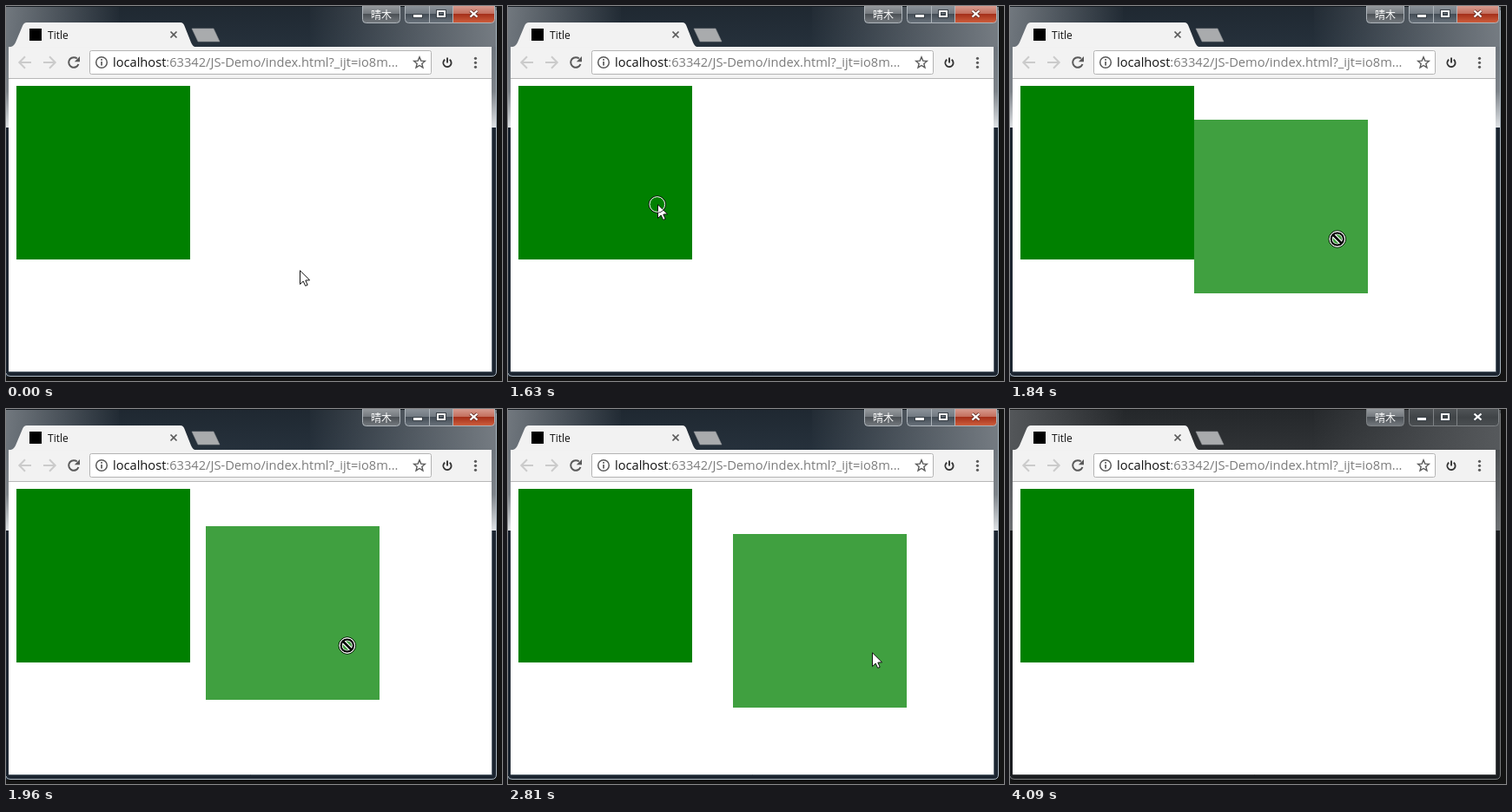
These frames come from a looping animation (571x432 px, 4.16 s). An HTML page with a canvas:

```html
<!DOCTYPE html>
<html lang="en">
<head>
<meta charset="utf-8">
<title>Drag demo</title>
<style>
  html, body { margin: 0; width: 100%; height: 100%; overflow: hidden; background: #141414; }
  canvas { display: block; }
</style>
</head>
<body>
<canvas id="stage" width="571" height="432"></canvas>
<script>
const g = document.getElementById('stage').getContext('2d');
const LOOP = 4160;
const SANS = '"Open Sans", "Noto Sans", sans-serif';
const CJK = '"Noto Sans CJK SC", "Noto Sans CJK", sans-serif';

// [time, x, y]
const approach = [[370, 337, 300], [420, 336, 295], [460, 335, 291], [510, 334, 289]];
const toBox = [[1070, 331, 289], [1130, 324, 286], [1170, 307, 279], [1210, 282, 269], [1250, 251, 257],
  [1290, 220, 246], [1330, 195, 236], [1380, 178, 230], [1420, 172, 228]];
const leave = [[3090, 434, 313], [3130, 466, 392]];
const moves = [[0, 338, 304], ...approach, ...toBox, [2810, 419, 280], ...leave];
const drag = [[1630, 172, 228], [1660, 195, 236], [1720, 291, 257], [1750, 346, 262], [1780, 368, 266],
  [1930, 390, 271], [1960, 393, 272], [2110, 416, 279], [2140, 418, 280], [2289, 418, 280], [2290, 419, 280]];
const GRAB = [160, 136];

function rect(x, y, w, h, fill) {
  g.fillStyle = fill;
  g.fillRect(x, y, w, h);
}

function poly(points, fill, stroke, width = 1) {
  g.beginPath();
  points.forEach(([x, y]) => g.lineTo(x, y));
  g.closePath();
  if (fill) { g.fillStyle = fill; g.fill(); }
  if (stroke) { g.strokeStyle = stroke; g.lineWidth = width; g.stroke(); }
}

function line(points, color, width) {
  g.beginPath();
  points.forEach(([x, y]) => g.lineTo(x, y));
  g.strokeStyle = color;
  g.lineWidth = width;
  g.stroke();
}

function arc(x, y, r, color, width, from = 0, to = Math.PI * 2) {
  g.beginPath();
  g.arc(x, y, r, from, to);
  g.strokeStyle = color;
  g.lineWidth = width;
  g.stroke();
}

function box(x, y, w, h, radii, fill, stroke) {
  g.beginPath();
  g.roundRect(x, y, w, h, radii);
  if (fill) { g.fillStyle = fill; g.fill(); }
  if (stroke) { g.strokeStyle = stroke; g.lineWidth = 1; g.stroke(); }
}

function grad(x0, y0, x1, y1, ...stops) {
  const gr = g.createLinearGradient(x0, y0, x1, y1);
  stops.forEach(([at, color]) => gr.addColorStop(at, color));
  return gr;
}

function text(str, x, y, font, color, align = 'left') {
  g.font = font;
  g.fillStyle = color;
  g.textAlign = align;
  g.fillText(str, x, y);
}

function drawFrame(active) {
  rect(0, 0, 571, 432, '#141414');
  box(-8, -8, 573, 435, 6, active ? '#1c2530' : '#1b1d20');
  rect(0, 0, 565, 48, active ? grad(0, 0, 0, 48, [0, '#1f2831'], [1, '#26313c'])
                             : grad(0, 0, 0, 48, [0, '#24272a'], [1, '#303336']));
  const glow = active ? '128,134,140' : '92,95,98';
  rect(0, 0, 130, 48, grad(0, 0, 130, 24, [0, `rgba(${glow},.85)`], [1, `rgba(${glow},0)`]));
  rect(350, 0, 215, 48, grad(350, 48, 565, 10, [0, `rgba(${glow},0)`], [1, `rgba(${glow},.9)`]));

  const side = active ? grad(0, 47, 0, 140, [0, '#6f767d'], [.55, '#7d8389'], [1, '#dfe2e5'])
                      : grad(0, 47, 0, 140, [0, '#4b4e51'], [1, '#6d7073']);
  rect(0, 47, 3, 93, side);
  rect(559, 47, 6, 93, side);

  const edge = active ? '#a9b6c0' : '#77797b';
  g.beginPath();
  g.moveTo(564.5, 5);
  g.lineTo(564.5, 421);
  g.quadraticCurveTo(564.5, 426.5, 559, 426.5);
  g.lineTo(5, 426.5);
  g.quadraticCurveTo(.5, 426.5, 0, 423);
  g.strokeStyle = edge;
  g.lineWidth = 1;
  g.stroke();
  rect(0, 0, 565, 1, active ? '#151b21' : '#1a1b1c');
  line([[3, 421.5], [559.5, 421.5], [559.5, 140]], active ? '#58636d' : '#47494b', 1);
}

function drawButtons(active) {
  const rim = active ? '#aeb5bb' : '#7f8386';
  const glass = active
    ? grad(0, 0, 0, 19, [0, '#8b9299'], [.45, '#727a82'], [.5, '#434c55'], [1, '#68717a'])
    : grad(0, 0, 0, 19, [0, '#505457'], [.5, '#404447'], [1, '#4a4e51']);
  const user = grad(0, 0, 0, 19, [0, '#969a9e'], [.45, '#757a7f'], [.5, '#4c5156'], [1, '#73787d']);
  const red = grad(0, 0, 0, 19, [0, '#d79b8f'], [.45, '#c4705f'], [.5, '#a5301a'], [1, '#cd5d3c']);

  box(410.5, -4.5, 43, 24, 4, user, rim);
  text('晴木', 432, 14.5, `12px ${CJK}`, '#fff', 'center');
  box(459.5, -4.5, 28, 24, [0, 0, 0, 4], glass, rim);
  box(487.5, -4.5, 27, 24, 0, glass, rim);
  box(514.5, -4.5, 48, 24, [0, 0, 4, 0], active ? red : glass, rim);

  const dark = '#3a4148';
  rect(468, 9, 12, 5, dark);
  rect(469, 10, 10, 3, '#fff');
  g.strokeStyle = dark;
  g.lineWidth = 4;
  g.strokeRect(497, 6, 8, 6);
  g.strokeStyle = '#fff';
  g.lineWidth = 2;
  g.strokeRect(497, 6, 8, 6);
  for (const [color, w] of [[active ? '#6a3229' : dark, 4], ['#fff', 2.3]]) {
    line([[534.5, 5.5], [542.5, 12.5]], color, w);
    line([[542.5, 5.5], [534.5, 12.5]], color, w);
  }
}

function drawToolbar() {
  const bar = '#f2f2f2', ink = '#5a5a5a', faint = '#cbcbcb';
  poly([[214, 26], [239, 26], [246, 41], [221, 41]], '#a9abad', '#8b8f93', .6);
  rect(3, 47, 556, 36, bar);
  g.beginPath();
  g.moveTo(3, 47.5);
  g.quadraticCurveTo(9, 47, 11, 42);
  g.lineTo(19, 23);
  g.quadraticCurveTo(20.5, 19, 24, 19);
  g.lineTo(201, 19);
  g.quadraticCurveTo(204, 19, 205.5, 23);
  g.lineTo(213, 42);
  g.quadraticCurveTo(215, 47, 219, 47.5);
  g.closePath();
  g.fillStyle = bar;
  g.fill();
  rect(3, 83, 556, 1, '#b8b8b8');

  rect(27, 26, 14, 14, '#000');
  text('Title', 48, 37.5, `12px ${SANS}`, '#111');
  line([[189.5, 29.5], [196.5, 36.5]], ink, 1.7);
  line([[196.5, 29.5], [189.5, 36.5]], ink, 1.7);

  // back and forward
  for (const [x, d] of [[22, -1], [50, 1]]) {
    line([[x - 7 * d, 65], [x + 6 * d, 65]], faint, 2);
    line([[x, 58.3], [x + 6.7 * d, 65], [x, 71.7]], faint, 2);
  }
  // reload
  arc(78, 65, 5.8, ink, 2, .35, Math.PI * 1.72);
  poly([[85, 58], [85, 64.2], [78.8, 64.2]], ink);

  box(96.5, 51.5, 393, 27, 2, '#fff', '#b3b3b3');
  arc(110, 65, 6.3, ink, 1.5);
  rect(109.2, 64, 1.7, 4.6, ink);
  rect(109.2, 61, 1.7, 1.8, ink);
  const font = `14.65px ${SANS}`;
  text('localhost', 123, 70, font, '#111');
  const x = 123 + g.measureText('localhost').width;
  text(':63342/JS-Demo/index.html?_ijt=io8m...', x, 70, font, '#7b7b7b');

  const star = [];
  for (let i = 0; i < 10; i++) {
    const a = i * Math.PI / 5 - Math.PI / 2, r = i % 2 ? 3 : 6.7;
    star.push([476 + r * Math.cos(a), 65.5 + r * Math.sin(a)]);
  }
  poly(star, null, ink, 1.4);

  arc(508, 65.5, 4.6, '#333', 1.9, -Math.PI * .3, Math.PI * 1.3);
  rect(507.1, 59.5, 1.9, 6, '#333');
  for (const y of [60, 65, 70]) {
    g.beginPath();
    g.arc(540.5, y + .3, 1.6, 0, 7);
    g.fillStyle = ink;
    g.fill();
  }
}

function drawArrow(x, y) {
  g.save();
  g.translate(x, y);
  poly([[.5, .8], [.5, 16.6], [4.2, 13.1], [6.7, 18.4], [9.2, 17.3], [6.8, 12.1], [11.6, 11.8]], '#fff', '#111');
  g.restore();
}

function drawRing(x, y) {
  arc(x, y, 9.7, '#000', 1);
  arc(x, y, 8.8, '#fff', 1);
}

function drawNoDrop(x, y) {
  arc(x, y, 7.2, '#fff', 4);
  line([[x - 5, y - 5], [x + 5, y + 5]], '#fff', 5);
  arc(x, y, 7.2, '#000', 2.3);
  line([[x - 5, y - 5], [x + 5, y + 5]], '#000', 2.5);
}

function along(path, t) {
  let i = 1;
  while (i < path.length - 1 && path[i][0] < t) i++;
  const [t0, x0, y0] = path[i - 1], [t1, x1, y1] = path[i];
  const k = Math.min(1, Math.max(0, (t - t0) / (t1 - t0)));
  return [Math.round(x0 + (x1 - x0) * k), Math.round(y0 + (y1 - y0) * k)];
}

function held(path, t) {
  const [, x, y] = path.filter(p => p[0] <= t).pop();
  return [x, y];
}

// The drag is sampled every 30 ms, then settles
function dragClock(t) {
  if (t >= 2320) return 2320;
  return Math.min(2170, 1630 + Math.floor((t - 1630) / 30) * 30);
}

function render(t) {
  const active = t < 4090;
  drawFrame(active);
  drawButtons(active);
  drawToolbar();
  rect(3, 84, 556, 337, '#fff');
  rect(12, 92, 200, 200, '#008000');

  const dragging = t >= 1630 && t < 2810;
  const now = dragClock(t);
  if (t >= 1690 && t < 2840) {
    const [x, y] = along(drag, now - 30);
    rect(x - GRAB[0], y - GRAB[1], 200, 200, 'rgba(0,128,0,.75)');
  }

  if (dragging) {
    const [x, y] = along(drag, now);
    if (t < 1690) drawArrow(x, y);
    else drawNoDrop(x - .2, y + .5);
    drawRing(x - .2, y + .5);
  } else if (t < 3170) {
    const [x, y] = held(moves, t);
    drawArrow(x, y);
    if (t >= 730 && t < 880) drawRing(x + 1.5, y + 1.5);
  }
}

const start = performance.now();
function tick() {
  render((performance.now() - start) % LOOP);
  requestAnimationFrame(tick);
}
tick();
</script>
</body>
</html>
```
